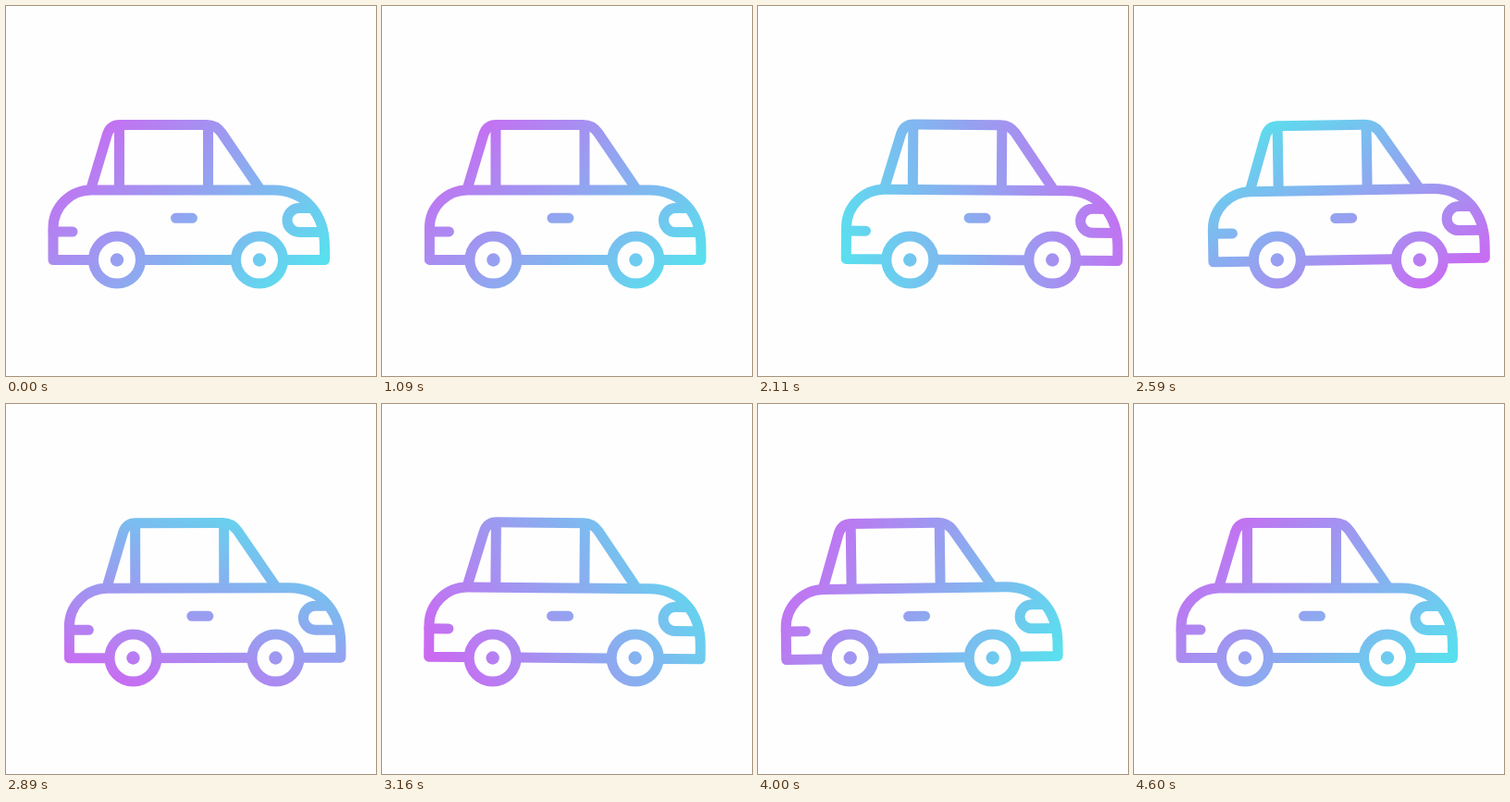
These frames come from a looping animation (400x400 px, 4630 ms). An HTML page:

```html
<!DOCTYPE html>
<html lang="en">
<head>
<meta charset="utf-8">
<title>Car</title>
<style>
  html, body { margin: 0; width: 100%; height: 100%; overflow: hidden; background: #fefefe; }
  svg { display: block; width: 100vw; height: 100vh; }
</style>
</head>
<body>
<svg viewBox="0 0 400 400">
  <defs>
    <linearGradient id="paint" gradientUnits="userSpaceOnUse">
      <stop offset="0" stop-color="#ca6af2"/>
      <stop offset="1" stop-color="#5adfee"/>
    </linearGradient>
  </defs>
  <g id="car" fill="none" stroke="url(#paint)" stroke-width="11" stroke-linejoin="round">
    <g id="body">
      <path d="M92 197 L109.500 138.500 Q113 128.500 123 128.500 H217 Q227 128.500 233 137 L274 197"/>
      <path d="M122.500 128.500 V199 M218.500 128.500 V199"/>
      <path d="M120 274.500 H51 V240 A41 41 0 0 1 92 199 H289 C323 199 344.500 225 344.500 260 V274.500 H274 M120 274.500 H274"/>
      <path d="M331 218.500 H317 a13 13 0 0 0 0 26 H343"/>
      <path d="M51 244 H72 M183.500 229.300 H201.500" stroke-linecap="round"/>
    </g>
    <g fill="#fefefe">
      <circle cx="120" cy="274.500" r="25.500"/>
      <circle cx="274" cy="274.500" r="25.500"/>
    </g>
    <g fill="url(#paint)" stroke="none">
      <circle cx="120" cy="274.500" r="7.200"/>
      <circle cx="274" cy="274.500" r="7.200"/>
    </g>
  </g>
</svg>
<script>
const LOOP = 4630;
const $ = id => document.getElementById(id);
const car = $('car'), body = $('body'), paint = $('paint');

// Keys are [time, value].
const drive = [[1020, 0], [2190, 44.8], [3800, -23.8], [4600, 0]];
const tilt = [[1020, 0], [1570, 0.9], [2110, 0.4], [2590, -0.9], [3160, 0.5], [4000, -0.8], [4600, 0]];
const turn = [[1020, 45], [1570, 80], [2110, 164], [2590, 240], [3160, 331], [4000, 390], [4600, 405]];

function locate(keys, t) {
  const last = keys.length - 1;
  t = Math.min(Math.max(t, keys[0][0]), keys[last][0]);
  let i = 0;
  while (i < last - 1 && t > keys[i + 1][0]) i++;
  const span = keys[i + 1][0] - keys[i][0];
  return { i, span, u: (t - keys[i][0]) / span };
}

function sineEase(keys, t) {
  const { i, u } = locate(keys, t);
  const a = keys[i][1], b = keys[i + 1][1];
  return a + (b - a) * (1 - Math.cos(Math.PI * u)) / 2;
}

function slope(keys, i) {
  if (i === 0 || i === keys.length - 1) return 0;
  const [t0, v0] = keys[i - 1], [t1, v1] = keys[i + 1];
  return (v1 - v0) / (t1 - t0);
}

// Smooth curve through the keys, at rest at both ends.
function spline(keys, t) {
  const { i, span, u } = locate(keys, t);
  const a = keys[i][1], b = keys[i + 1][1], w = 1 - u;
  return a * w * w * (1 + 2 * u) + b * u * u * (3 - 2 * u)
    + span * u * w * (slope(keys, i) * w - slope(keys, i + 1) * u);
}

function setPaint(deg) {
  const c = Math.cos(deg * Math.PI / 180), s = Math.sin(deg * Math.PI / 180);
  const half = Math.hypot(165 * c, 115 * s);
  paint.setAttribute('x1', 200 - half * c);
  paint.setAttribute('y1', 214 - half * s);
  paint.setAttribute('x2', 200 + half * c);
  paint.setAttribute('y2', 214 + half * s);
}

function draw(t) {
  car.setAttribute('transform', `translate(${sineEase(drive, t)} 0)`);
  body.setAttribute('transform', `rotate(${spline(tilt, t)} 197 274.5)`);
  setPaint(spline(turn, t));
}

let start;
function tick(now) {
  if (start === undefined) start = now;
  draw((now - start) % LOOP);
  requestAnimationFrame(tick);
}
draw(0);
requestAnimationFrame(tick);
</script>
</body>
</html>
```
